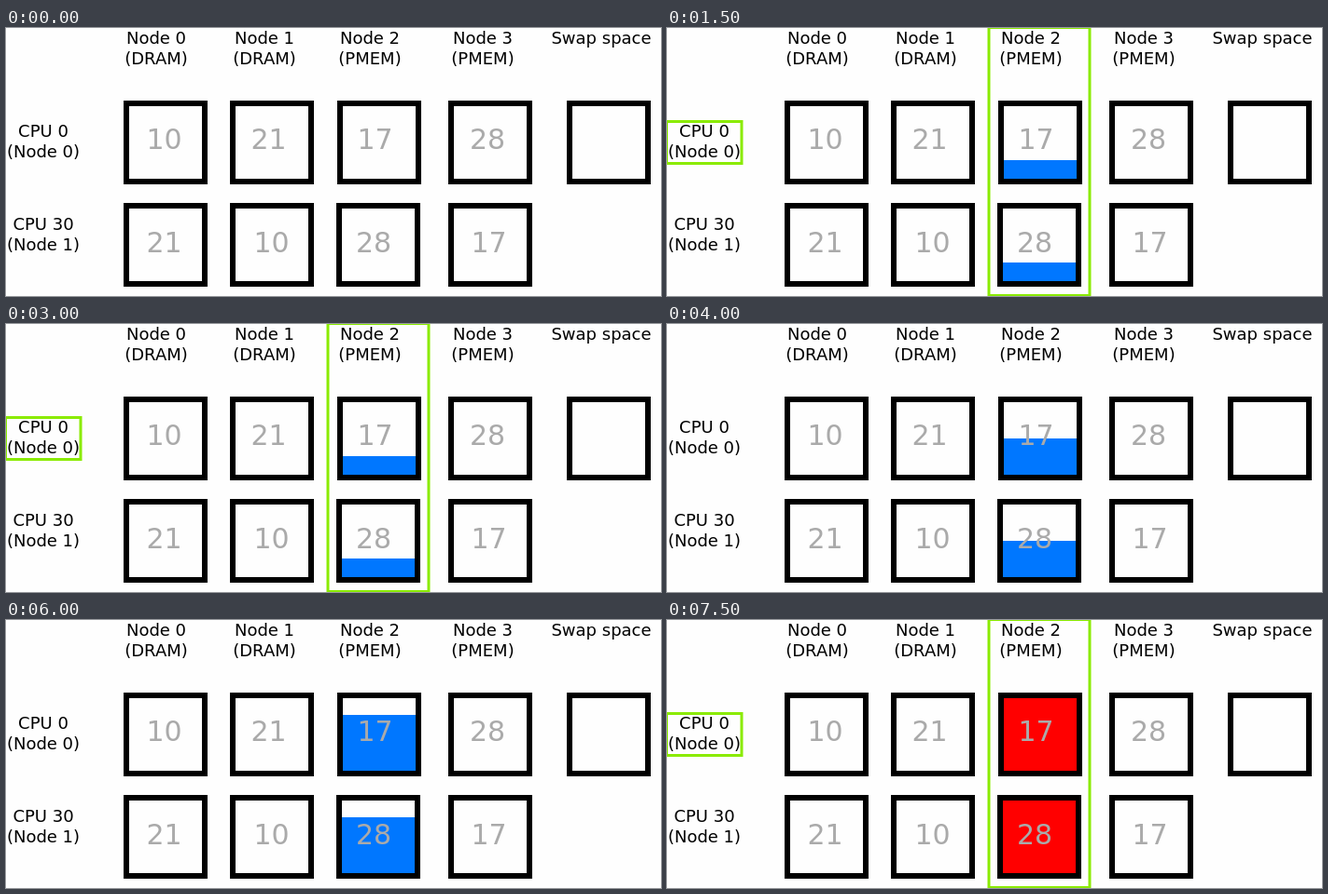
An HTML page for the animation above (8000 ms loop, 702 by 288 pixels).

```html
<!DOCTYPE html>
<html>
<head>
<meta charset="utf-8">
<style>
html, body { margin: 0; width: 100%; height: 100%; overflow: hidden; background: #fefefe; }
svg { display: block; }
text { font: 18px "DejaVu Sans", sans-serif; text-anchor: middle; }
.distance { font-size: 30px; fill: #aaa; }
.box { fill: none; stroke: #000; stroke-width: 6; }
.mark { fill: none; stroke: #8aeb00; stroke-width: 3; }
</style>
</head>
<body>
<svg id="stage" width="702" height="288" viewBox="0 0 702 288"></svg>
<script>
const stage = document.getElementById('stage');
const LOOP = 8000, CYCLE = 2000, STEP = 500;
const LEVELS = [0, 20, 39, 60, 78];

function add(name, attrs, content = '') {
  const el = document.createElementNS('http://www.w3.org/2000/svg', name);
  for (const key in attrs) el.setAttribute(key, attrs[key]);
  el.textContent = content;
  return stage.appendChild(el);
}

const rect = (cls, x, y, width, height) => add('rect', { class: cls, x, y, width, height });
const box = (x, y) => rect('box', x + 3, y + 3, 84, 84);
const label = (x, y, ...lines) =>
  lines.forEach((line, i) => add('text', { x, y: y + 22 * i }, line));

// Fills lie under the distances and the box outlines
const fills = [[361, 162], [360, 272]].map(([x, bottom]) => ({ el: rect('fill', x, bottom, 78, 0), bottom }));

[161, 277, 390, 511].forEach((x, i) => label(x, 17, 'Node ' + i, i < 2 ? '(DRAM)' : '(PMEM)'));
label(638, 17, 'Swap space');
label(40, 117, 'CPU 0', '(Node 0)');
label(40, 217, 'CPU 30', '(Node 1)');

const rows = [
  { y: 78, boxes: [126, 240, 355, 474, 601], distances: [[10, 169.5], [21, 281.5], [17, 395.5], [28, 516]] },
  { y: 188, boxes: [126, 240, 354, 474], distances: [[21, 169.5], [10, 284.5], [28, 394], [17, 517.5]] }
];
rows.forEach(({ y, boxes, distances }, i) => {
  boxes.forEach(x => box(x, y));
  distances.forEach(([value, x]) => add('text', { class: 'distance', x, y: 130 + 111 * i }, value));
});

const cpuMark = rect('mark', -0.5, 100.5, 80.5, 45);
const nodeMark = rect('mark', 345, -0.5, 108, 288);

function draw(now) {
  const t = now % LOOP;
  const phase = Math.floor(t % CYCLE / STEP);
  const level = Math.floor(t / CYCLE) + (phase === 3 ? 1 : 0);
  const height = LEVELS[level];

  cpuMark.style.display = phase >= 1 ? '' : 'none';
  nodeMark.style.display = phase >= 2 ? '' : 'none';
  for (const { el, bottom } of fills) {
    el.setAttribute('y', bottom - height);
    el.setAttribute('height', height);
    el.setAttribute('fill', level === 4 ? '#f00' : '#0077ff');
  }
}

function frame() {
  draw(performance.now());
  requestAnimationFrame(frame);
}
frame();
</script>
</body>
</html>
```
